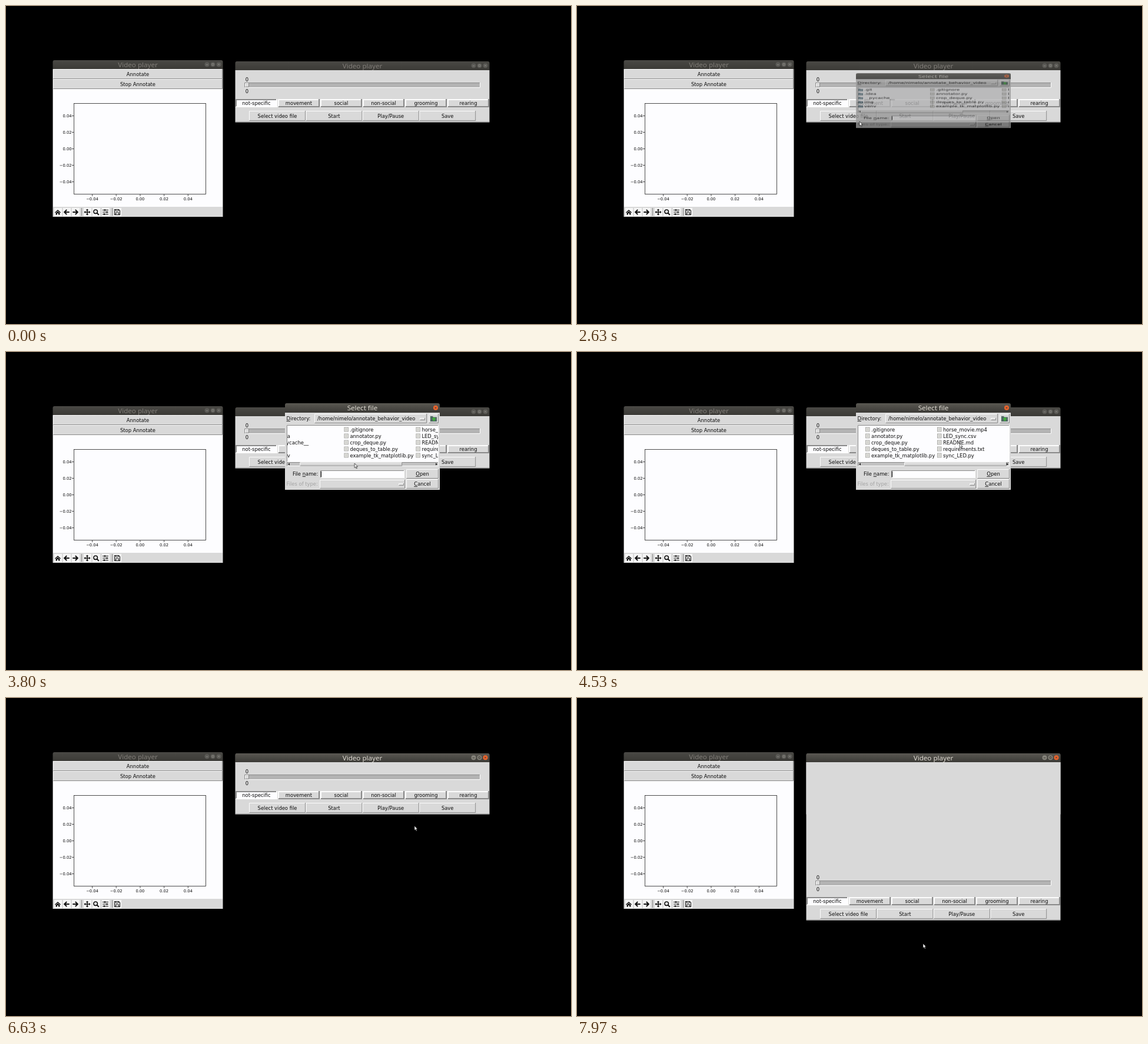
These frames come from a looping animation (960x540 px, 8000 ms). An HTML page:

```html
<!DOCTYPE html>
<html lang="en">
<head>
<meta charset="utf-8">
<title>Video player</title>
<style>
  html, body { margin: 0; width: 100%; height: 100%; overflow: hidden; background: #000; }
  svg { display: block; width: 100%; height: 100%; }
  text { font: 8.4px "DejaVu Sans", sans-serif; fill: #0a0a0a; white-space: pre; }
  .tick { font-size: 6.75px; }
  .title { font: 11.6px "Noto Sans", sans-serif; fill: #807d78; }
  .lit .title { fill: #dfdbd2; }
  .off { fill: #a3a3a3; }
  .mnemonic { text-decoration: underline; }

  .anim { animation: 8s linear infinite; }
  .step { animation-timing-function: step-end; }
  #pointer { animation-name: travel; }
  #arrow { animation-name: enter; }
  #dialog { animation-name: unfold; transform-origin: 605px 161px; }
  #files { animation-name: scroll; }
  #thumb { animation-name: drag; }
  #caret { animation-name: blink; }
  #focus { animation-name: focus; }
  #controls { animation-name: lower; }
  #tall { animation-name: grow; }
  .picked { animation-name: pick; }

  @keyframes travel {
    0%, 8.75% { transform: translate(947px, 486px); }
    10.375% { transform: translate(859px, 480px); }
    11.25% { transform: translate(720px, 440px); }
    12.5%, 20.375% { transform: translate(508px, 266px); }
    21.25%, 23.75% { transform: translate(479px, 195px); }
    25%, 34.125% { transform: translate(480px, 196px); }
    40.875% { transform: translate(547px, 196px); }
    44.125%, 46% { transform: translate(575px, 189px); }
    52.5%, 53.5% { transform: translate(649px, 189px); }
    56.625% { transform: translate(650px, 155px); }
    60%, 65.375% { transform: translate(655px, 129px); }
    72.5%, 75.875% { transform: translate(700px, 206px); }
    82.875% { transform: translate(694px, 217px); }
    86.25% { transform: translate(690px, 226px); }
    94.125%, 95.875% { transform: translate(583px, 401px); }
    97.125%, 99.12% { transform: translate(592px, 417px); }
    99.125%, 99.61% { transform: translate(601px, 418px); }
    99.62%, 100% { transform: translate(588px, 417px); }
  }
  @keyframes enter { 0% { opacity: 0; } 8.75%, 100% { opacity: 1; } }
  @keyframes unfold {
    0%, 31.75% { transform: scaleY(.3); opacity: 0; filter: brightness(.45); }
    32.875% { transform: scaleY(.63); opacity: .8; filter: brightness(.7); }
    34.75%, 76% { transform: none; opacity: 1; filter: brightness(1); }
    78.125%, 100% { transform: scaleY(.3); opacity: 0; filter: brightness(.45); }
  }
  @keyframes scroll {
    0%, 46% { transform: translateX(0); }
    52.5%, 100% { transform: translateX(-110px); }
  }
  @keyframes drag {
    0%, 46% { transform: translateX(0); }
    52.5%, 100% { transform: translateX(74px); }
  }
  @keyframes blink {
    0% { opacity: 1; } 40% { opacity: 0; } 43.75% { opacity: 1; }
    51.25% { opacity: 0; } 55% { opacity: 1; } 61.875%, 100% { opacity: 0; }
  }
  @keyframes focus {
    0% { opacity: 0; } 24.125% { opacity: 1; } 31.75% { opacity: 0; } 77.5%, 100% { opacity: 1; }
  }
  @keyframes lower {
    0% { transform: translateY(0); } 84.375%, 100% { transform: translateY(180px); }
  }
  @keyframes grow { 0% { opacity: 0; } 84.375%, 100% { opacity: 1; } }
  @keyframes pick { 0% { opacity: 0; } 61.875%, 100% { opacity: 1; } }
</style>
</head>
<body>
<svg id="stage" viewBox="0 0 960 540"></svg>
<script>
const PANEL = '#d9d9d9', LIGHT = '#fcfcfc', DARK = '#8a8a8a', PAPER = '#fdfdff';

const rect = (x, y, w, h, fill, extra = '') =>
  `<rect x="${x}" y="${y}" width="${w}" height="${h}" fill="${fill}" ${extra}/>`;
const stroke = (d, color, width = 1) =>
  `<path d="${d}" fill="none" stroke="${color}" stroke-width="${width}"/>`;
const label = (x, y, str, anchor = 'start', cls = '') =>
  `<text x="${x}" y="${y}" text-anchor="${anchor}" class="${cls}">${str}</text>`;
const mnemonic = c => `<tspan class="mnemonic">${c}</tspan>`;

// Box with bevelled edges; swap the edge colours for a sunken one.
function bevel(x, y, w, h, fill = PANEL, edge = 1, top = LIGHT, bottom = DARK) {
  const e = edge / 2, r = x + w - e, b = y + h - e;
  return rect(x, y, w, h, fill) +
    stroke(`M${x + e} ${b}V${y + e}H${r}`, top, edge) +
    stroke(`M${x + e} ${b}H${r}V${y}`, bottom, edge);
}
const sunken = (x, y, w, h, fill, edge = 1) => bevel(x, y, w, h, fill, edge, DARK, LIGHT);
const caption = (x, y, w, h, str) => label(x + w / 2, y + h / 2 + 3, str, 'middle');
const button = (x, y, w, h, str, edge) =>
  bevel(x, y, w, h, PANEL, edge) + caption(x, y, w, h, str);
const pressed = (x, y, w, h, str, edge) =>
  sunken(x, y, w, h, PAPER, edge) + caption(x, y, w, h, str);

function titleBar(x, y, w, h, str, lit, dots = [27, 17, 7]) {
  const cy = y + h / 2 - .3, last = dots.length - 1;
  const marks = dots.map((d, i) => {
    const cx = x + w - d;
    const fill = !lit ? '#5b5a56' : i === last ? '#ee642c' : '#85837a';
    const ink = lit ? '#3a3833' : '#8a8882';
    const glyph = i === last ? `M${cx - 1.4} ${cy - 1.4}l2.8 2.8m0-2.8l-2.8 2.8`
      : i ? `M${cx - 1.5} ${cy - 1.5}h3v3h-3z` : `M${cx - 1.7} ${cy + .5}h3.4`;
    return `<circle cx="${cx}" cy="${cy}" r="4" fill="${fill}"/>` + stroke(glyph, ink, .9);
  }).join('');
  return `<g class="${lit ? 'lit' : ''}">
    <path d="M${x} ${y + h}v${3 - h}q0-3 3-3h${w - 6}q3 0 3 3v${h - 3}z" fill="url(#${lit ? 'bright' : 'dim'})"/>
    ${label(x + w / 2, y + h / 2 + 4, str, 'middle', 'title')}${marks}</g>`;
}

function plotWindow() {
  const values = ['−0.04', '−0.02', '0.00', '0.02', '0.04'];
  const ticks = values.map((v, i) => {
    const x = 146.5 + 40.7 * i, y = 298.5 - 28 * i;
    return stroke(`M${x} 319.5v3.5M115.5 ${y}h-3.5`, '#222', .8) +
      label(x, 329.5, v, 'middle', 'tick') + label(111.5, y + 2.5, v, 'end', 'tick');
  }).join('');
  const icons = [
    [88, '<path d="M-5 .5L0-4 5 .5 4 1.5 0-2-4 1.5zM-3.4 1.8L0-1.2 3.4 1.8V4.5H1V2H-1V4.5H-3.4z" fill="#111"/>'],
    [103, stroke('M4.7 0H-3.5M.2-4L-3.8 0 .2 4', '#111', 2)],
    [118, stroke('M-4.7 0H3.5M-.2-4L3.8 0-.2 4', '#111', 2)],
    [138, stroke('M-4.5 0H4.5M0-4.5V4.5', '#111', 1.5) +
      '<path d="M-5.5 0l2.4-2.3v4.6zM5.5 0L3.1-2.3v4.6zM0-5.5l-2.3 2.4h4.6zM0 5.5l-2.3-2.4h4.6z" fill="#111"/>'],
    [153, '<circle cx="-.8" cy="-.8" r="3.2" fill="none" stroke="#111" stroke-width="1.6"/>' + stroke('M1.6 1.6L4.8 4.8', '#111', 2)],
    [169, stroke('M-5-3.500H5M-5 0H5M-5 3.500H5', '#111', 1) + stroke('M-1-4.700v2.400M2.500-1.200v2.400M-2 2.300v2.400', '#111', 2)],
    [189, stroke('M-4.500-4.500H2.500L4.500-2.500V4.500H-4.500zM-2.500 4.500V1H2.500V4.500', '#111', 1.1) + stroke('M-2.500-4.500V-1.800H1.800V-4.500', '#111', 1)]
  ].map(([x, art]) => rect(x - 6, 343, 13, 14, '#f6f6f6') +
    `<g transform="translate(${x} 350)">${art}</g>`).join('');
  return rect(79.5, 107, 289, 251, PANEL) +
    titleBar(79.5, 92, 289, 15, 'Video player') +
    button(80, 107, 288, 17, 'Annotate') + button(80, 124, 288, 17, 'Stop Annotate') +
    rect(80, 141, 288, 200, PAPER) +
    rect(115.5, 165.5, 224, 154, 'none', 'stroke="#222" stroke-width=".8"') + ticks + icons +
    stroke('M128.5 343v13M180.5 343v13', DARK);
}

function playerWindow() {
  const modes = ['not-specific', 'movement', 'social', 'non-social', 'grooming', 'rearing']
    .map((m, i) => (i ? button : pressed)(390 + 72 * i, 158, 71, 14, m, 2)).join('');
  const actions = ['Select video file', 'Start', 'Play/Pause', 'Save']
    .map((a, i) => button(413 + 96.4 * i, 178, 96, 17, a)).join('');
  return rect(389.5, 109, 432, 88.5, PANEL) +
    rect(389.5, 109, 432, 268.5, PANEL, 'id="tall" class="anim step"') +
    titleBar(389.5, 94, 432, 15, 'Video player') +
    `<g id="focus" class="anim step">${titleBar(389.5, 94, 432, 15, 'Video player', true)}</g>
    <g id="controls" class="anim step">
      ${label(409.5, 128, '0', 'middle')}${label(409.5, 148, '0', 'middle')}
      ${sunken(405, 130, 401, 9, '#b3b3b3')}${bevel(406, 131, 7, 7)}
      ${modes}${actions}${stroke('M390 197H821', DARK)}
    </g>`;
}

function fileList() {
  const columns = [
    [478, ['.git', '.idea', '__pycache__', 'img', 'venv']],
    [600, ['.gitignore', 'annotator.py', 'crop_deque.py', 'deques_to_table.py', 'example_tk_matplotlib.py']],
    [722, ['horse_movie.mp4', 'LED_sync.csv', 'README.md', 'requirements.txt', 'sync_LED.py']]
  ];
  return columns.map(([x, names], col) => names.map((name, row) => {
    const y = 131.5 + 11 * row;
    const icon = col
      ? rect(x + .5, y - 3.5, 6.5, 7, '#e6e6e2', 'stroke="#9c9c98" stroke-width=".8"') +
        stroke(`M${x + 2} ${y - 1}h3.5m-3.5 2h3.5`, '#b5b5b0', .7)
      : `<path d="M${x} ${y - 3}h3l1 1h4v5.5h-8z" fill="#546f7c"/>` + rect(x + 1, y, 6, 2.5, '#87a0aa');
    return icon + label(x + 10, y + 3, name);
  }).join('')).join('');
}

function dialog() {
  const knob = (x, y) => bevel(x, y, 9, 4);
  return `<g id="dialog" class="anim">` +
    rect(474, 103, 263, 131, PANEL) + titleBar(474, 87, 263, 16, 'Select file', true, [7]) +
    label(476.5, 116, mnemonic('D') + 'irectory:') +
    bevel(524, 105, 191, 16) + label(529, 116, '/home/nimelo/annotate_behavior_video') + knob(703, 112) +
    bevel(718, 105, 17, 16) +
    '<path d="M721 109h4l1 1.500h6v7.500h-11z" fill="#4f6a62"/><path d="M727 110.500l3.500 3.500h-2v3h-3v-3h-2z" fill="#43b33d"/>' +
    sunken(477, 124, 258, 63, PAPER) +
    `<g clip-path="url(#pane)"><g id="files" class="anim">
      ${rect(731, 126, 76, 11, '#c3c3c3', 'class="anim step picked"')}${fileList()}</g></g>` +
    sunken(477, 187, 258, 7, '#c3c3c3') + `<g id="thumb" class="anim">${bevel(482, 187.5, 174, 6)}</g>` +
    '<path d="M482 188.500v4l-3-2zM730 188.500v4l3-2z" fill="#222"/>' +
    label(487, 210, `File ${mnemonic('n')}ame:`) + sunken(534, 201, 143, 13, PAPER) +
    rect(535, 202.5, 1, 10, '#111', 'id="caret" class="anim step"') +
    label(536.5, 210, 'horse_movie.mp4', 'start', 'anim step picked') +
    button(680, 199, 55, 16, mnemonic('O') + 'pen') +
    label(476.5, 227, 'Files of type:', 'start', 'off') + bevel(533, 217, 145, 15) + knob(667, 223) +
    button(680, 216, 55, 16, mnemonic('C') + 'ancel') + '</g>';
}

const gradient = (id, top, bottom) => `<linearGradient id="${id}" x2="0" y2="1">
  <stop stop-color="${top}"/><stop offset="1" stop-color="${bottom}"/></linearGradient>`;

document.getElementById('stage').innerHTML =
  `<defs>${gradient('dim', '#4a4945', '#3b3a36')}${gradient('bright', '#5a5852', '#3b3a36')}
    <clipPath id="pane">${rect(478, 125, 256, 61, '#000')}</clipPath></defs>` +
  rect(0, 0, 960, 540, '#000') + plotWindow() + playerWindow() + dialog() +
  `<g id="pointer" class="anim"><path id="arrow" class="anim step"
    d="M0 0V7.600L1.700 6.100 3 8.900 4.300 8.300 3 5.600H5.200Z" fill="#fff" stroke="#111" stroke-width=".7"/></g>`;
</script>
</body>
</html>
```
